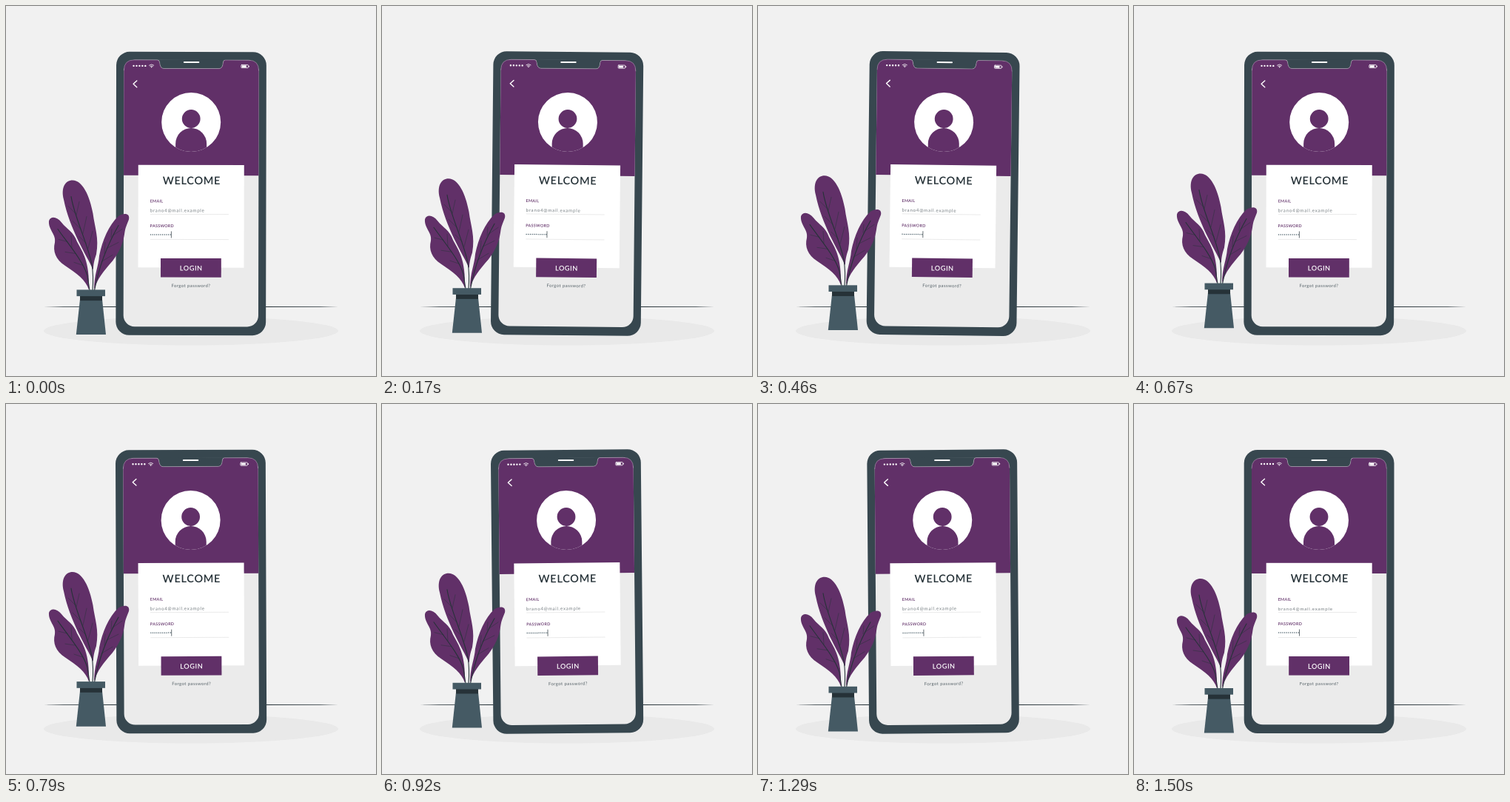
Animation of 500x500 px, one loop 1.54 s. Source, as an HTML page:

```html
<!DOCTYPE html>
<html lang="en">
<head>
<meta charset="utf-8">
<title>Login screen</title>
<style>
  @property --n { syntax: "<number>"; inherits: true; initial-value: 0; }

  html, body { margin: 0; width: 100%; height: 100%; overflow: hidden; background: #f1f1f1; }

  svg {
    display: block; width: 100vw; height: 100vh;
    --purple: #613068; --slate: #37474f; --pot: #455a64; --ink: #263238;
    animation: cycle 1540ms steps(37, start) -3ms infinite;
  }
  @keyframes cycle { from { --n: 0; } to { --n: 37; } }

  /* triangle waves over 36 steps, then one step of rest */
  #phone, #plant { --p: min(1, var(--n) / 36); }
  #phone {
    transform-origin: 250px 253.5px;
    transform: rotate(calc(1deg * max(min(4 * var(--p), 2 - 4 * var(--p)), 4 * var(--p) - 4)));
  }
  #plant { transform: translateY(calc(-20px * min(var(--p), 1 - var(--p)))); }

  text { font-family: Lato, "Open Sans", sans-serif; }
  .purple { fill: var(--purple); }
  .slate { fill: var(--slate); }
  .pot { fill: var(--pot); }
  .ink { fill: var(--ink); }
  .white { fill: #fff; }
  .title { font-size: 14.5px; font-weight: 600; letter-spacing: .7px; }
  .label { font-size: 5.4px; font-weight: 600; letter-spacing: .3px; }
  .button { font-size: 9.2px; font-weight: 600; letter-spacing: .55px; }
  .value { font-size: 6.2px; letter-spacing: .75px; fill: #757d81; }
  .link { font-size: 6px; letter-spacing: .4px; fill: #566268; }
  .mid { text-anchor: middle; }
  .line { fill: none; stroke-linecap: round; stroke-linejoin: round; }
  .rule { stroke: #dcdcdc; stroke-width: .6; }
  .rib { stroke: var(--ink); stroke-width: 1.1; }
  .vein { stroke: var(--ink); stroke-width: .5; }
</style>
</head>
<body>
<svg viewBox="0 0 500 500">
  <defs>
    <clipPath id="disc"><circle cx="250" cy="157" r="40"/></clipPath>
  </defs>

  <ellipse cx="250" cy="439" rx="199" ry="19.5" fill="#e9e9e9"/>
  <path class="ink" d="M51 406.6L77 406.3L151 406.1L250 405.9L349 406.1L424 406.3L449 406.6L424 406.9L349 407.1L250 407.3L151 407.1L77 406.9Z"/>

  <g id="phone">
    <rect class="slate" x="148.7" y="62" width="202.8" height="383" rx="18"/>
    <rect x="159" y="73" width="182.3" height="360.3" rx="15" fill="#ebebeb"/>
    <path class="purple" d="M159 229V87Q159 73 173 73H204Q207 73 207.3 76.5Q208 84.5 213 84.5H287.5Q292.5 84.5 293 76.5Q293.3 73 296 73H327.3Q341.3 73 341.3 87V229Z"/>
    <path class="slate" d="M204 72.5Q207 73 207.3 76.5Q208 84.5 213 84.5H287.5Q292.5 84.5 293 76.5Q293.3 73 296 72.5Z"/>
    <path class="line" stroke="#d8ccda" stroke-width=".4" d="M159 87Q159 73 173 73H204Q207 73 207.3 76.5Q208 84.5 213 84.5H287.5Q292.5 84.5 293 76.5Q293.3 73 296 73H327.3Q341.3 73 341.3 87"/>
    <rect class="white" x="239.5" y="75" width="21.5" height="2" rx="1"/>

    <path class="line" stroke="#fff" stroke-width="2.4" stroke-dasharray="0 3.95" d="M172.2 81H188.5"/>
    <g class="line" stroke="#fff" stroke-width=".8">
      <path d="M193.2 80.2Q196.3 77.7 199.4 80.2M194.5 81.6Q196.3 80.2 198.1 81.6"/>
      <rect x="317.5" y="79.3" width="9.5" height="4.2" rx=".8"/>
    </g>
    <circle class="white" cx="196.3" cy="82.7" r=".8"/>
    <path class="white" d="M318.3 80H324.5V82.8H318.3ZM327.5 80.5H328.5V82.3H327.5Z"/>
    <path class="line" stroke="#fff" stroke-width="1.4" d="M176.5 101.2L171.8 105.5L176.5 109.8"/>

    <circle class="white" cx="250" cy="157" r="40"/>
    <g class="purple" clip-path="url(#disc)">
      <circle cx="250" cy="152.5" r="12.4"/>
      <path d="M229 200V186A21 21 0 0 1 271 186V200Z"/>
    </g>

    <rect class="white" x="178.7" y="214.8" width="143" height="138.7"/>
    <text class="title ink mid" x="250.9" y="241">WELCOME</text>
    <text class="label purple" x="194.7" y="265.6">EMAIL</text>
    <text class="value" x="194.7" y="278.5">brano4@mail.example</text>
    <path class="rule" d="M195 281.5H301M195 315.5H301"/>
    <text class="label purple" x="194.7" y="299">PASSWORD</text>
    <path class="line" stroke="#455a64" stroke-width="1.5" stroke-dasharray="0 2.65" d="M195.7 309H222.5"/>
    <path stroke="#263238" stroke-width=".7" d="M223.5 304.5V313.5"/>

    <rect class="purple" x="209.2" y="341" width="81.8" height="25.6"/>
    <text class="button white mid" x="250.4" y="357.6">LOGIN</text>
    <text class="link mid" x="250.2" y="380">Forgot password?</text>
  </g>

  <g id="plant">
    <g class="purple">
      <path d="M118 357C108 336 86 302 78 262C74 246 80 236 90 236C103 236 113 256 117.500 281C120 300 126 314 122 336C119 345 118 350 118 357Z"/>
      <path d="M112 384C108 371 96 362 80 351.500C67 343 63 332 66 320C68 309 57 303 58 291C60 284 69 285 75 293C83 303 91 305 96 319C104 334 113 345 112 384Z"/>
      <path d="M119 384C119 364 125 352 126 338C130 318 139 296 152 284.500C160 279.500 168 281 166 289C163 297 161 300 160 309C158 322 153 333 144 345C131 360 124 368 119 384Z"/>
    </g>
    <g class="line rib">
      <path d="M88 258C92 285 110 320 116 350C118 362 118 372 117 385"/>
      <path d="M70 302C84 322 104 345 110 365L113 385"/>
      <path d="M152 297C140 318 127 345 119.500 385"/>
    </g>
    <path class="line vein" d="M94 281L84 271M101 302L90 291M108 321L99 312M95 283L99 265M104 308L109 285M111 328L117 305M83 319L71 316M94 335L80 333M104 351L92 347M89 327L88 311M144 311L157 302M136 328L152 320M129 346L144 337M142 313L143 302M133 335L134 320"/>
    <path class="pot" d="M100 397H130L135 444.600H94.800Z"/>
    <rect class="ink" x="100" y="392" width="30" height="6.700"/>
    <rect class="pot" x="95.500" y="384" width="38.500" height="8.700"/>
  </g>
</svg>
</body>
</html>
```
